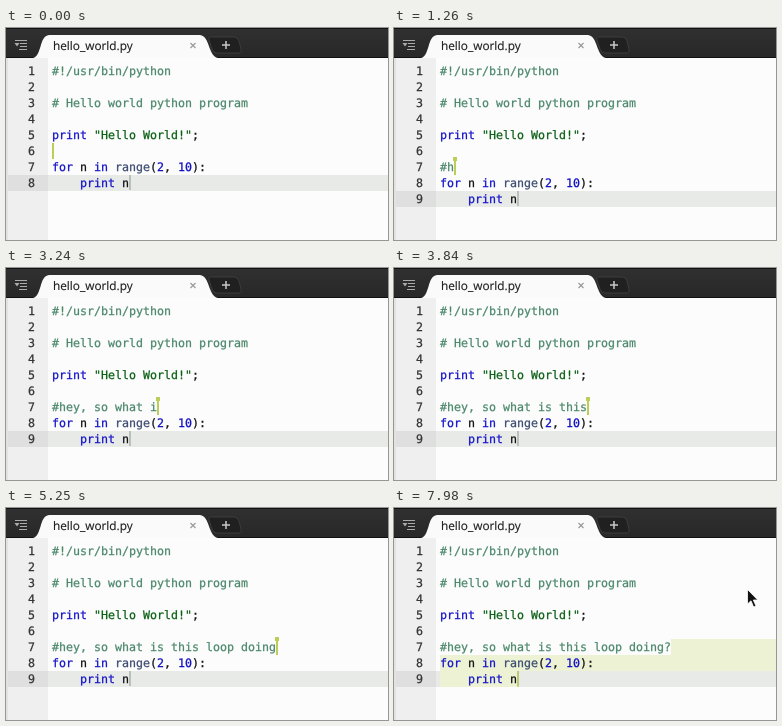
An HTML page that plays this animation: 382x212 px, repeating every 8 s.

```html
<!DOCTYPE html>
<html lang="en">
<head>
<meta charset="utf-8">
<title>Collaborative code editor</title>
<style>
  html, body { margin: 0; width: 100%; height: 100%; overflow: hidden; background: #fcfcfc; }
  svg { display: block; width: 382px; height: 212px; }
  text { white-space: pre; text-rendering: geometricPrecision; }
  text, tspan { fill: currentColor; stroke: currentColor; }
  .code { font: 11.63px "DejaVu Sans Mono", monospace; color: #111; stroke-width: .25; }
  .title { font: 11.8px "Open Sans", "Noto Sans", sans-serif; color: #1c1c1c; stroke-width: .15; }
  .comment { color: #4c886b; }
  .keyword { color: #1414c8; }
  .string { color: #0a5f14; }
  .builtin { color: #3c4c72; }
  .number { color: #1010c0; }
  .line-number { color: #333; }
</style>
</head>
<body>
<svg viewBox="0 0 382 212">
  <defs>
    <linearGradient id="bar" x2="0" y2="1">
      <stop offset="0" stop-color="#303030"/>
      <stop offset="1" stop-color="#282828"/>
    </linearGradient>
  </defs>
  <rect width="382" height="212" fill="#fcfcfc"/>
  <rect y="29" width="42" height="183" fill="#efefef"/>
  <rect y="29" width="2" height="183" fill="#e2e2e2"/>

  <rect width="382" height="30" fill="url(#bar)"/>
  <path d="M0 .5H382M0 29.5H382" stroke="#111"/>
  <path d="M27 30C36 28 33 8 43 7H194C204 8 202 28 212 30Z" fill="#fafafa"/>
  <path d="M204 9H228Q232 9 233 13L235 21Q236 25 232 25H211Q207 25 206 21L203 12Q202 9 204 9Z" fill="#202020" stroke="#424242" stroke-width=".8"/>
  <path d="M216 17H224M220 13V21" stroke="#c8c8c8" stroke-width="1.5"/>
  <path d="M9 12.5H21M14 15.5H21M14 18.5H21M13 21.5H21" stroke="#aaa"/>
  <path d="M8.5 15H13.5L11 18.5Z" fill="#aaa"/>
  <path d="M184.5 15L189.5 20M189.5 15L184.5 20" stroke="#999" stroke-width="1.2"/>
  <text class="title" x="47" y="22">hello_world.py</text>

  <g class="code">
    <g id="active" stroke="none">
      <rect x="2" width="40" height="16" fill="#dfdfdf"/>
      <rect x="42" width="340" height="16" fill="#e8eae8"/>
    </g>
    <path id="selection" d="M277 131H382V163H124V179H46V147H277Z" fill="#edf2d4"/>
    <g id="numbers"></g>
    <g id="head"></g>
    <text id="typed" class="comment" x="46" y="142.6"></text>
    <g id="loop"></g>
    <rect id="caret" x="123.5" width="1" height="15" fill="#8a948e"/>
    <path id="remote" fill="#bccd58"/>
  </g>
  <path id="pointer" d="M353.5 81.5V96L357 92.8L359.6 99L362 98L359.3 92H363.8Z" fill="#111" stroke="#fff" stroke-width=".8"/>
</svg>
<script>
const DURATION = 8000, LEFT = 46, CHAR = 7, ROW = 16;
const FLAG_AT = 30, NEWLINE_AT = 570, SELECT_AT = 6090, POINTER_AT = 7980;
const MESSAGE = "#hey, so what is this loop doing?";
const $ = id => document.getElementById(id);
const rowTop = n => 19 + ROW * n;
const baseline = n => 30.6 + ROW * n;
const show = (id, on) => $(id).setAttribute("visibility", on ? "visible" : "hidden");
const move = (id, y) => $(id).setAttribute("transform", `translate(0 ${y})`);

// Bursts of typing: characters, first key time, last key time.
const keyTimes = [
  [1, 960, 960], [3, 1230, 1470], [1, 2220, 2220], [10, 2490, 3225],
  [1, 3330, 3330], [6, 3555, 3870], [2, 4080, 4140], [2, 4440, 4500],
  [3, 4710, 4830], [2, 5010, 5070], [1, 5250, 5250], [1, 5940, 5940]
].flatMap(([count, from, to]) =>
  Array.from({ length: count }, (_, i) => from + (to - from) * i / Math.max(1, count - 1)));

const span = (kind, text) => `<tspan class="${kind}">${text}</tspan>`;
const line = (n, content) => `<text x="${LEFT}" y="${baseline(n)}">${content}</text>`;

$("head").innerHTML =
  line(1, span("comment", "#!/usr/bin/python")) +
  line(3, span("comment", "# Hello world python program")) +
  line(5, span("keyword", "print") + " " + span("string", '"Hello World!"') + ";");
$("loop").innerHTML =
  line(7, span("keyword", "for") + " n " + span("keyword", "in") + " " + span("builtin", "range") +
    `(${span("number", "2")}, ${span("number", "10")}):`) +
  line(8, "    " + span("keyword", "print") + " n");
$("numbers").innerHTML = Array.from({ length: 9 }, (_, i) =>
  `<text id="number${i + 1}" class="line-number" x="22" y="${baseline(i + 1)}">${i + 1}</text>`).join("");

function render(time) {
  const inserted = time >= NEWLINE_AT;
  const selected = time >= SELECT_AT;
  const lastLine = inserted ? 9 : 8;
  const count = keyTimes.filter(at => at <= time).length;

  $("typed").textContent = MESSAGE.slice(0, count);
  move("loop", inserted ? ROW : 0);
  move("active", rowTop(lastLine));
  move("caret", rowTop(lastLine));
  show("number9", inserted);
  show("selection", selected);
  show("pointer", time >= POINTER_AT);

  const x = selected ? 123 : LEFT + count * CHAR;
  const y = rowTop(selected ? 9 : inserted ? 7 : 6);
  const flag = time >= FLAG_AT && !selected ? `M${x - 1} ${y - 2}h4v4h-4z` : "";
  $("remote").setAttribute("d", `M${x} ${y}h2v16h-2z${flag}`);
  $("remote").setAttribute("opacity", selected ? .7 : 1);
}

const start = performance.now();
function tick() {
  render((performance.now() - start) % DURATION);
  requestAnimationFrame(tick);
}
render(0);
requestAnimationFrame(tick);
</script>
</body>
</html>
```
